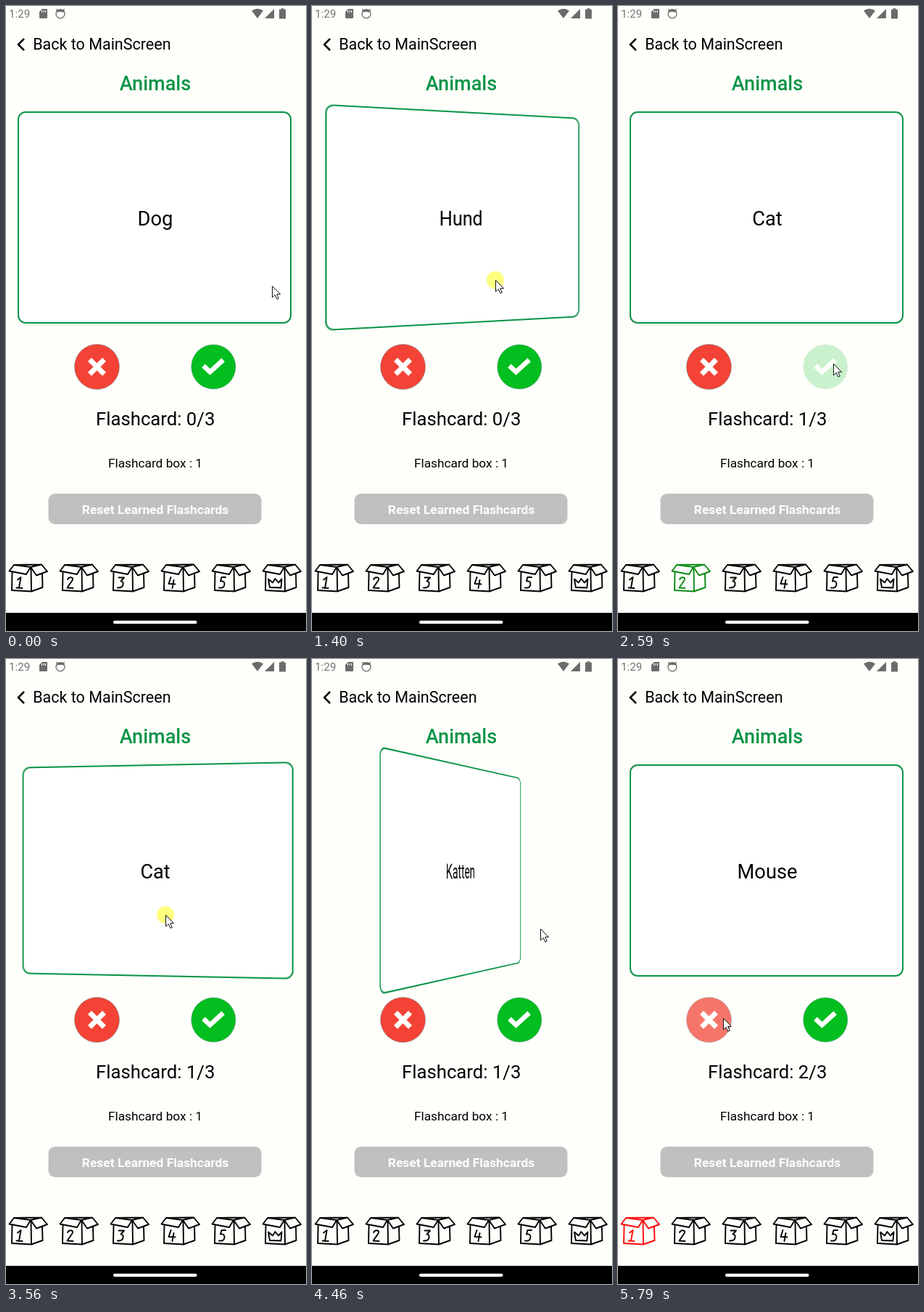
Animation, 414 px wide and 860 px high, one loop 5820 ms. Source, as an HTML page:

```html
<!DOCTYPE html>
<html lang="en">
<head>
<meta charset="utf-8">
<title>Flashcards</title>
<style>
  html, body { margin: 0; width: 100%; height: 100%; overflow: hidden; background: #fefffa; }
  #stage { position: absolute; left: 0; top: 0; width: 414px; height: 860px; overflow: hidden; }
  #card {
    position: absolute; left: 16px; top: 145px; width: 378px; height: 292px;
    box-sizing: border-box; padding: 3px 0 0 2px;
    border: 2px solid #0a9447; border-radius: 11px; background: #fff;
    display: flex; align-items: center; justify-content: center;
    font: 27.3px Roboto, sans-serif; color: #000;
  }
  svg { position: absolute; left: 0; top: 0; font-family: Roboto, sans-serif; }
  .mid { text-anchor: middle; }
</style>
</head>
<body>
<div id="stage">
  <div id="card"></div>
  <svg width="414" height="860" viewBox="0 0 414 860">
    <!-- status bar -->
    <g fill="#6b6b6b">
      <text x="4" y="16.3" font-size="15.2" fill="#757575">1:29</text>
      <path d="M50 4H56Q57 4 57 5V16Q57 17 56 17H47Q46 17 46 16V8Z"/>
      <path d="M49.5 6v3M52 6v3M54.5 6v3" stroke="#fefffa" stroke-width="1"/>
      <circle cx="75" cy="10.8" r="6" fill="none" stroke="#6b6b6b" stroke-width="1.3"/>
      <path d="M69.5 9Q71 4.5 75 4.5T80.5 9Q78 8 75 8T69.5 9ZM69 3.5l3 2-2 2zM81 3.5l-3 2 2 2z"/>
      <path d="M339 6.5Q347 1 355 6.5L347 17Z"/>
      <path d="M370 4V17H357Z"/>
      <path d="M379.5 3.2H383.5V4.8H386V17.5H377V4.8H379.5Z"/>
    </g>
    <!-- header -->
    <path d="M25 45L17 53L25 61" fill="none" stroke="#000" stroke-width="2.5"/>
    <text x="37.2" y="60" font-size="21.5">Back to MainScreen</text>
    <text class="mid" x="206" y="116" font-size="27.1" font-weight="500" fill="#0a9447">Animals</text>
    <!-- answer buttons -->
    <g id="no">
      <circle cx="125.5" cy="496.5" r="31" fill="#f44336" stroke="#5f8a88" stroke-width=".5"/>
      <path d="M115.5 486.5L135.5 506.5M135.5 486.5L115.5 506.5" stroke="#fff" stroke-width="7"/>
    </g>
    <g id="yes">
      <circle cx="286.3" cy="496.5" r="30.6" fill="#02be1e" stroke="#5f8a88" stroke-width=".5"/>
      <path d="M272.5 495L281.5 503.6L299.7 487" fill="none" stroke="#fff" stroke-width="6.6"/>
    </g>
    <text class="mid" id="count" x="206.2" y="577" font-size="25.7"></text>
    <text class="mid" x="206" y="635" font-size="17.3">Flashcard box : 1</text>
    <rect x="58.5" y="671" width="294" height="42" rx="9" fill="#c0c0c0"/>
    <text class="mid" x="206" y="699" font-size="17.4" font-weight="700" fill="#fff">Reset Learned Flashcards</text>
    <g id="boxes" fill="none" stroke-width="1.9" stroke-linejoin="round" stroke-linecap="round"></g>
    <!-- navigation bar -->
    <rect y="835" width="414" height="25"/>
    <rect x="148" y="845.7" width="115.5" height="4.3" rx="2.1" fill="#fff"/>
    <!-- pointer -->
    <g id="pointer">
      <circle id="glow" r="12" fill="#ff0" fill-opacity=".5"/>
      <path d="M.5 .5V16L4.2 12.6L6.9 18.4L9.3 17.3L6.7 11.7H11.6Z" fill="#fff" stroke="#111" stroke-width="1"/>
    </g>
  </svg>
</div>
<script>
const LOOP = 5820, FLIP = 500;
const $ = id => document.getElementById(id);
const clamp = v => Math.min(1, Math.max(0, v));

// cubic-bezier(.42, 0, 1, 1)
function easeIn(x) {
  let lo = 0, hi = 1, s = 0.5;
  for (let i = 0; i < 24; i++) {
    s = (lo + hi) / 2;
    const px = 1.26 * s * (1 - s) ** 2 + 3 * s * s * (1 - s) + s ** 3;
    if (px < x) lo = s; else hi = s;
  }
  return 3 * s * s * (1 - s) + s ** 3;
}
const easeInOut = x => x < 0.5 ? easeIn(2 * x) / 2 : 1 - easeIn(2 - 2 * x) / 2;
const ramp = (t, start, len) => easeInOut(clamp((t - start) / len));

const words = [
  { from: 0, front: 'Dog', back: 'Hund', open: 300, close: 1292 },
  { from: 2590, front: 'Cat', back: 'Katten', open: 3498, close: 4266 },
  { from: 5600, front: 'Mouse', back: '', open: LOOP, close: LOOP }
];

const taps = [[200, 415], [1195, 1418], [2150, 2380], [3410, 3625], [4160, 4372], [5150, 5370]];

const path = [
  [0, 367, 385], [70, 367, 385], [230, 152, 383], [700, 152, 383], [1190, 253, 377],
  [1430, 253, 377], [1840, 315, 477], [1900, 315, 477], [2090, 297, 492], [2620, 297, 492],
  [3150, 344, 365], [3410, 220, 352], [3630, 220, 352], [4130, 152, 376], [4372, 152, 376],
  [4460, 315, 371], [4950, 281, 488], [4990, 281, 488], [5150, 145, 494], [LOOP, 145, 494]
];

const carton = 'M11 769L4.5 777.5L28 782L34 772ZM34 772L42 783.5L57 778L49 768.5ZM11 769L49 768.5' +
  'M8.5 779L8 804L35 805.5L34.5 773M35 805.5L50.5 800L50 781';
const marks = [
  'M16 789.5L20.5 786L18 800.5M14.5 800.5L22.5 801',
  'M15 789Q17 785.5 20.5 786.5T20 792.5L14.5 800.5L22.5 801',
  'M15.5 786.5L23 786.5L18.5 791.5Q22.5 792 21.5 796.5T14 800.5',
  'M17.5 786L14.5 795L23.5 795.5M21.5 790L19.5 801',
  'M23 786L17.5 786L16 791.5Q22 790.5 21.5 796T14 800.5',
  'M12 788.5L14 800L29.5 800.5L30.5 788.5L26 793.5L21.5 788L18 793.5Z'
];
const boxes = marks.map((mark, i) => {
  const p = document.createElementNS('http://www.w3.org/2000/svg', 'path');
  p.setAttribute('d', carton + mark);
  p.setAttribute('transform', `translate(${i * 70} 0)`);
  $('boxes').appendChild(p);
  return p;
});

function pointerAt(t) {
  let i = 1;
  while (i < path.length - 1 && path[i][0] < t) i++;
  const [t0, x0, y0] = path[i - 1], [t1, x1, y1] = path[i];
  const k = clamp((t - t0) / (t1 - t0)), e = k * k * (3 - 2 * k);
  return [x0 + (x1 - x0) * e, y0 + (y1 - y0) * e];
}

const fade = (t, press, release) => 1 - 0.8 * (ramp(t, press, 150) - ramp(t, release, 250));

function draw(t) {
  const n = words.findLastIndex(w => t >= w.from), w = words[n];
  const angle = 180 * (ramp(t, w.open, FLIP) - ramp(t, w.close, FLIP));
  const turned = angle > 90;
  $('card').textContent = turned ? w.back : w.front;
  $('card').style.transform = angle
    ? `perspective(1115px) rotateY(${turned ? 180 - angle : -angle}deg)` : 'none';
  $('count').textContent = `Flashcard: ${n}/3`;

  $('yes').setAttribute('opacity', fade(t, 2160, 2600));
  $('no').setAttribute('opacity', fade(t, 5160, 5640));
  boxes.forEach((b, i) => {
    const red = i === 0 && t >= 5600;
    const green = i === 1 && t >= 2590 && t < 3340;
    b.setAttribute('stroke', red ? '#ff0a0a' : green ? '#0a8a14' : '#000');
  });

  const [x, y] = pointerAt(t);
  $('pointer').setAttribute('transform', `translate(${x} ${y})`);
  $('glow').setAttribute('visibility', taps.some(([a, b]) => t >= a && t < b) ? 'visible' : 'hidden');
}

const start = performance.now();
function tick(now) {
  draw(Math.max(0, now - start) % LOOP);
  requestAnimationFrame(tick);
}
draw(0);
requestAnimationFrame(tick);
</script>
</body>
</html>
```
